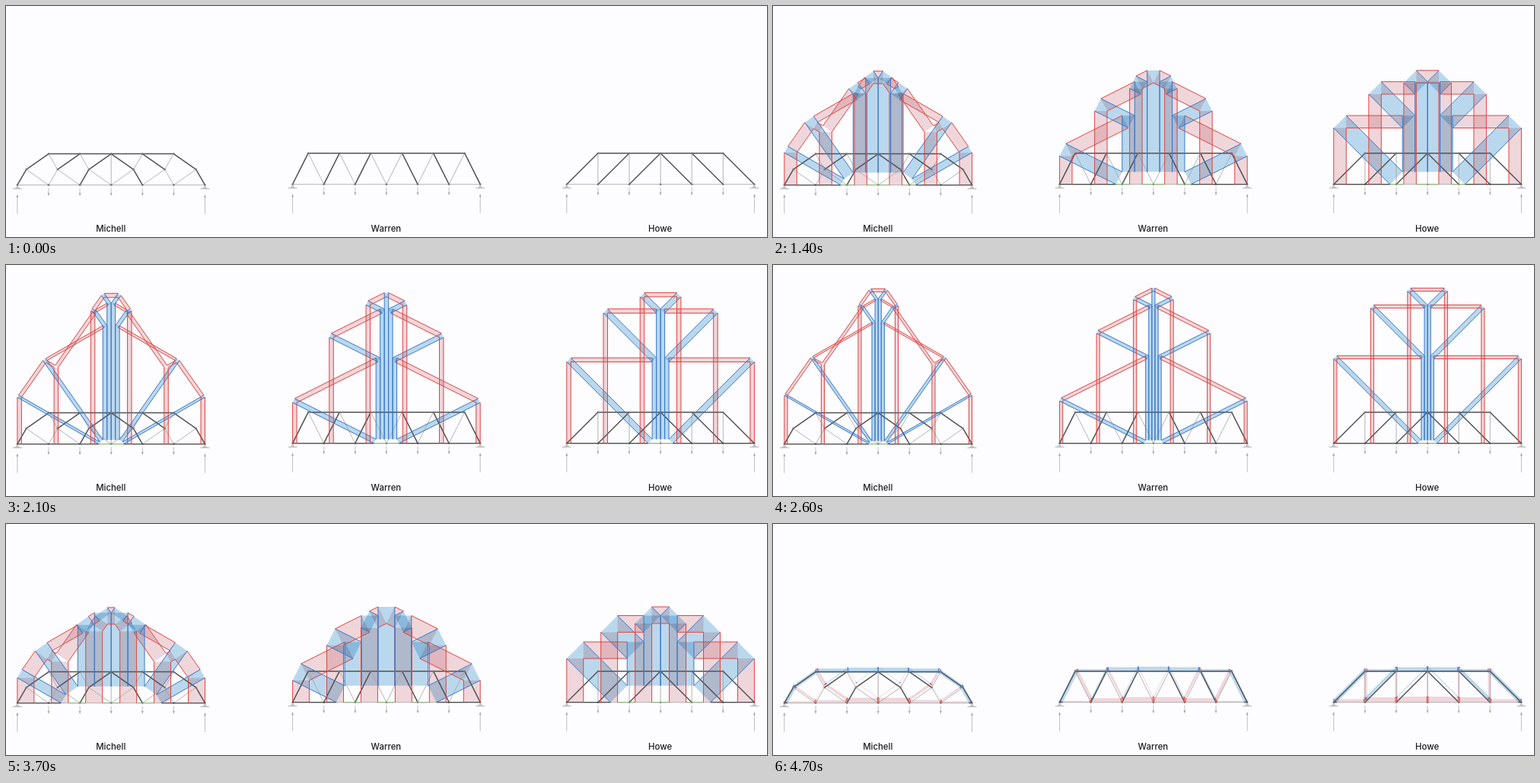
Recreate the animation shown at these times as an HTML page with a canvas. Size 1000 by 304 pixels, loop 4.8 s.

```html
<!DOCTYPE html>
<html lang="en">
<head>
<meta charset="utf-8">
<title>Truss form and force diagrams</title>
<style>
  html, body { margin: 0; width: 100%; height: 100%; overflow: hidden; background: #fdfcfe; }
  canvas { display: block; width: 1000px; height: 304px; }
</style>
</head>
<body>
<canvas id="stage"></canvas>
<script>
const canvas = document.getElementById('stage');
const ctx = canvas.getContext('2d');
const ratio = window.devicePixelRatio || 1;
canvas.width = 1000 * ratio;
canvas.height = 304 * ratio;

const PANEL = 41.1, HEIGHT = 41, SPAN = 6 * PANEL, LOAD = SPAN / 5;
const TENSION = { fill: '#f1d9dc', stroke: '#de4540' };
const COMPRESSION = { fill: '#bcdbee', stroke: '#3a78c8' };

// Node kinds: b = bottom chord, T = top chord, t = top chord at half panels, m = mid height.
const LAST = { b: 6, T: 6, t: 5, m: 5 };
const mirrorName = name => name[0] + (LAST[name[0]] - name[1]);

function nodePosition(name, x, base) {
  const k = +name[1];
  switch (name[0]) {
    case 'b': return [x + k * PANEL, base];
    case 'T': return [x + k * PANEL, base - HEIGHT];
    case 't': return [x + (k + 0.5) * PANEL, base - HEIGHT];
    default: return [x + (k < 3 ? k * PANEL + 11.8 : (k + 1) * PANEL - 11.8), base - HEIGHT / 2];
  }
}

// Point q with (q - a) perpendicular to u and (q - b) perpendicular to v.
function intersect([a, u], [b, v]) {
  const p = u[0] * a[0] + u[1] * a[1], q = v[0] * b[0] + v[1] * b[1];
  const det = u[0] * v[1] - u[1] * v[0];
  return [(p * v[1] - q * u[1]) / det, (u[0] * q - v[0] * p) / det];
}

// Builds a truss from the faces of its left half and solves its force diagram.
function makeTruss(label, x, base, leftFaces) {
  const at = name => nodePosition(name, x, base);
  const direction = (i, j) => [at(j)[0] - at(i)[0], at(j)[1] - at(i)[1]];
  const top = { q: [x + SPAN / 2, base] };
  const below = Array.from({ length: 6 }, (_, k) => ({ q: [x + k * LOAD, base] }));

  const left = leftFaces.split(',').map(text => text.trim().split(' '));
  const loops = [...left, ...left.map(loop => loop.map(mirrorName).reverse())];
  const edges = new Map();
  const faces = loops.map(loop => {
    const face = { q: null, sides: loop.map((name, n) => [name, loop[(n + 1) % loop.length]]) };
    for (const side of face.sides) edges.set(side.join(), face);
    return face;
  });
  const across = ([i, j]) => edges.get(j + ',' + i) || (i[0] + j[0] === 'bb' ? below[i[1]] : top);

  while (faces.some(face => !face.q)) {
    for (const face of faces.filter(f => !f.q)) {
      const known = face.sides.filter(side => across(side).q)
        .map(side => [across(side).q, direction(...side)]);
      if (known.length > 1) face.q = intersect(known[0], known[1]);
    }
  }

  const bars = [];
  for (const [key, face] of edges) {
    const [i, j] = key.split(',');
    if (edges.has(j + ',' + i) && i > j) continue;
    const q1 = face.q, q2 = across([i, j]).q, d = direction(i, j);
    const turn = d[0] * (q1[1] - q2[1]) - d[1] * (q1[0] - q2[0]);
    bars.push({ p1: at(i), p2: at(j), q1, q2, kind: turn < 0 ? TENSION : COMPRESSION });
  }
  const nodes = [...new Set(loops.flat())].map(at);
  const supports = [at('b0'), at('b6')];
  const loads = below.slice(1).map((space, k) => ({ p: at('b' + (k + 1)), q1: below[k].q, q2: space.q }));
  return { label, x, base, top, below, bars, nodes, supports, loads };
}

const trusses = [
  makeTruss('Michell', 14.9, 235.6,
    'b0 b1 m0, b1 m1 T1 m0, b1 b2 m1, m1 T2 T1, b2 m2 T2 m1, b2 b3 m2, m2 T3 T2, b3 T3 m2'),
  makeTruss('Warren', 376.6, 234.7,
    'b0 b1 t0, b1 t1 t0, b1 b2 t1, b2 t2 t1, b2 b3 t2, b3 t3 t2'),
  makeTruss('Howe', 736.8, 234.7,
    'b0 b1 T1, b1 T2 T1, b1 b2 T2, b2 T3 T2, b2 b3 T3')
];

const mix = (p, q, a) => [p[0] + (q[0] - p[0]) * a, p[1] + (q[1] - p[1]) * a];

function line(p, q, color, width) {
  ctx.strokeStyle = color;
  ctx.lineWidth = width;
  ctx.beginPath();
  ctx.moveTo(...p);
  ctx.lineTo(...q);
  ctx.stroke();
}

function polygon(points, color) {
  ctx.fillStyle = color;
  ctx.beginPath();
  points.forEach(p => ctx.lineTo(...p));
  ctx.fill();
}

function arrow(x, from, to, color) {
  const back = to + 3.5 * Math.sign(from - to);
  line([x, from], [x, to], color, 0.7);
  polygon([[x, to], [x - 1.5, back], [x + 1.5, back]], color);
}

function drawBarFills(bars, a) {
  ctx.globalCompositeOperation = 'multiply';
  for (const { p1, p2, q1, q2, kind } of bars) {
    polygon([mix(p1, q1, a), mix(p2, q1, a), mix(p2, q2, a), mix(p1, q2, a)], kind.fill);
  }
  ctx.globalCompositeOperation = 'source-over';
}

function drawForm({ bars, nodes, supports, loads }) {
  for (const { p1, p2, kind } of bars) {
    if (kind === TENSION) line(p1, p2, '#a2a2a2', 0.8);
    else line(p1, p2, '#535355', 1.5);
  }
  for (const [x, y] of nodes) {
    ctx.fillStyle = '#777';
    ctx.beginPath();
    ctx.arc(x, y, 1.3, 0, 2 * Math.PI);
    ctx.fill();
  }
  for (const [x, y] of supports) {
    polygon([[x, y + 1], [x - 3.5, y + 4.5], [x + 3.5, y + 4.5]], '#c4c4c4');
    line([x - 6, y + 5], [x + 6, y + 5], '#b4b4b4', 1);
    arrow(x, y + 38, y + 13, '#a6a6a6');
  }
  for (const { p: [x, y] } of loads) arrow(x, y + 4, y + 14, '#a9aea6');
}

function drawForces({ bars, loads, supports, below, top }, a) {
  for (const { p, q1, q2 } of loads) line(mix(p, q1, a), mix(p, q2, a), '#86b573', 1);
  supports.forEach((p, n) => {
    line(mix(p, below[5 * n].q, a), mix(p, top.q, a), '#4c4c4e', 1.2);
  });
  for (const { p1, p2, q1, q2, kind } of bars) {
    for (const p of [p1, p2]) line(mix(p, q1, a), mix(p, q2, a), kind.stroke, 1);
  }
}

// Sixty even steps per loop, shown at ten pictures per second.
function blendAt(ms) {
  const step = Math.round(Math.floor(ms % 4800 / 100) * 1.25);
  return 1 - Math.abs(1 - step / 30);
}

function draw(ms) {
  const a = blendAt(ms);
  ctx.setTransform(ratio, 0, 0, ratio, 0, 0);
  ctx.fillStyle = '#fdfcfe';
  ctx.fillRect(0, 0, 1000, 304);
  ctx.font = '500 11.4px Inter, sans-serif';
  ctx.textAlign = 'center';
  for (const truss of trusses) {
    if (a > 0) drawBarFills(truss.bars, a);
    drawForm(truss);
    if (a > 0) drawForces(truss, a);
    ctx.fillStyle = '#1c1c1e';
    ctx.fillText(truss.label, truss.x + SPAN / 2 - 0.5, 297);
  }
}

const start = performance.now();
function tick() {
  draw(performance.now() - start);
  requestAnimationFrame(tick);
}
tick();
</script>
</body>
</html>
```
